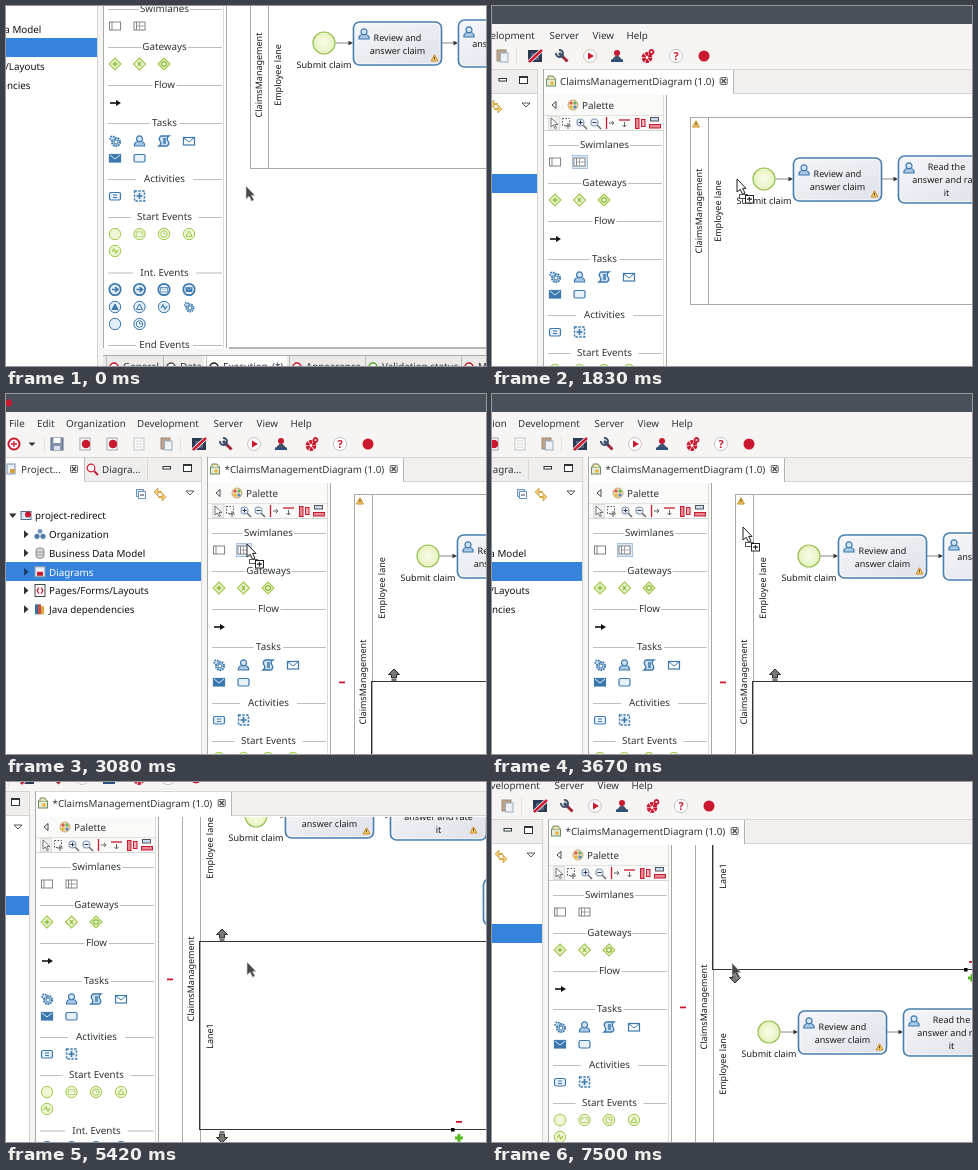
Write an HTML page that moves like this. It is 480 px wide and 360 px high and loops after 7.58 s.

```html
<!DOCTYPE html>
<html lang="en">
<head>
<meta charset="utf-8">
<title>Adding lanes to a diagram</title>
<style>
html, body { margin: 0; width: 100%; height: 100%; overflow: hidden; background: #fff; }
svg { display: block; width: 480px; height: 360px; }
text { font: 9.8px "Noto Sans", "Open Sans", sans-serif; fill: #2e3436; text-rendering: geometricPrecision; white-space: pre; }
.s { font-size: 9px; fill: #1a1a1a; }
.t { fill: #111; }
.m { text-anchor: middle; }
</style>
</head>
<body>
<svg viewBox="0 0 480 360">
  <defs>
    <linearGradient id="task" x2="1" y2="1"><stop stop-color="#f5f7fb"/><stop offset="1" stop-color="#dfe1e9"/></linearGradient>
    <radialGradient id="start"><stop stop-color="#f8fce9"/><stop offset="1" stop-color="#e4f2be"/></radialGradient>
    <clipPath id="view"><rect x="325" y="89" width="400" height="388"/></clipPath>
  </defs>
  <g id="world">
    <g id="ui"></g>
    <g id="mark"></g>
    <g id="icons"></g>
    <g id="tab"></g>
    <g id="pool" clip-path="url(#view)"></g>
    <g id="cursor"></g>
  </g>
</svg>
<script>
const $ = id => document.getElementById(id);
const BLUE = '#3b78ad', GREEN = '#a3c750', RED = '#c9182f', INK = '#2e3436', GREY = '#bdbdbb';

const rect = (x, y, w, h, fill, stroke = 'none', more = '') =>
  `<rect x="${x}" y="${y}" width="${w}" height="${h}" fill="${fill}" stroke="${stroke}" ${more}/>`;
const circ = (x, y, r, fill, stroke = 'none', w = 1) =>
  `<circle cx="${x}" cy="${y}" r="${r}" fill="${fill}" stroke="${stroke}" stroke-width="${w}"/>`;
const path = (d, stroke, w = 1, fill = 'none', more = '') =>
  `<path d="${d}" fill="${fill}" stroke="${stroke}" stroke-width="${w}" ${more}/>`;
const text = (x, y, s, cls = '', more = '') => `<text x="${x}" y="${y}" class="${cls}" ${more}>${s}</text>`;
const at = (x, y, body, k = 1) => `<g transform="translate(${x} ${y}) scale(${k})">${body}</g>`;
const hline = (x, y, w, c = GREY) => rect(x, y, w, 1, c);
const vline = (x, y, h, c = GREY) => rect(x, y, 1, h, c);
const upright = (x, y, s) => text(0, 0, s, 's m', `transform="translate(${x} ${y}) rotate(-90)"`);

// Glyphs, each centred on 0,0
const person = path('M-5 5V3Q-4 .5-1.6.5H1.6Q4 .5 5 3V5Z', BLUE, 1.2, '#a9c8e6') + circ(0, -2.2, 3, '#d3e4f5', BLUE, 1.2);
const mail = (c, fill = '#fff') => rect(-5.5, -3.5, 11, 7.5, fill, c, 'stroke-width="1.2"') +
  path('M-5-3 0 1 5-3', fill === BLUE ? '#dceafa' : c, 1);
const cog = (r, w) => `<circle r="${r}" fill="#cfe0f1" stroke="${BLUE}" stroke-width="${w}" stroke-dasharray="1.6 .9"/>`;
const gear = at(1, 1, cog(4, 2.2) + circ(0, 0, 2, '#fff', BLUE)) + at(-2.6, -2.6, cog(2.2, 1.6));
const script = path('M-3-5H5Q2-3 4 0T3 5H-5Q-2 3-4 0T-3-5ZM-1-2H2M-1 0H2M-1 2H2', BLUE, 1.3, '#cfe0f1');
const warn = path('M0-3.2 3.4 3H-3.4Z', '#c98a1c', 1, '#f8d27a', 'stroke-linejoin="round"') + rect(-.5, -1.2, 1, 2.6, '#654000');
const cross = path('M-2.2-2.2 2.2 2.2M2.2-2.2-2.2 2.2', '#444', 1.3) + rect(-3.5, -3.5, 7, 7, 'none', '#555', 'rx="1" stroke-width=".9"');
const page = rect(-5, -6, 10, 12, '#fcfcfc', '#a5a5a5') + path('M-3-3H3M-3 0H3M-3 3H3', '#ccc');
const lens = s => path('M2 2 6 6', '#666', 1.5) + circ(-.5, -.5, 3.5, '#eef4fb', '#7f97b0', 1.1) + path(s, '#335', 1);
const diamond = s => path('M0-6 6 0 0 6-6 0Z', GREEN, 1.1, '#e9f4cc') + path(s, '#8fb53a', 1.3);
const poolIcon = rect(-5.5, -4, 11, 8, '#fff', '#777', 'stroke-width=".9"') + path('M-3-4V4', '#777', .9);
const laneIcon = poolIcon + path('M-3 0H5M0-4V4', '#999', .9);
const event = (c, body, w = 1) => circ(0, 0, 5.7, c === GREEN ? '#edf7d3' : '#e3edf7', c, w) + body;
const tri = c => path('M0-3 3 2.4H-3Z', c, 1);
const wave = c => path('M-3 1-1-2 1 2 3-1', c, 1.2);
const clock = c => circ(0, 0, 3.2, '#fff', c, 1) + path('M0-2V0H2', c, 1);
const tinyMail = c => at(0, 0, mail(c), .6);
const arrowHead = (x, y) => path(`M${x} ${y}l-4.5-2.3v4.6z`, 'none', 0, '#333');
const moveUp = path('M0-6 5.5-.5H2.5V3H-2.5V-.5H-5.5Z', '#2a2a2a', 1, '#777') + path('M-2.5 5H2.5', '#2a2a2a', 1.3);

function frame() {
  const menu = { File: 3, Edit: 31, Organization: 60, Development: 131, Server: 207.5, View: 250.5, Help: 284.5 };
  const rows = ['Organization', 'Business Data Model', 'Diagrams', 'Pages/Forms/Layouts', 'Java dependencies'];
  let s = rect(0, 0, 760, 520, '#f6f5f4') + rect(0, 0, 760, 18, '#4a505a') + circ(2.5, 9, 3.5, RED);
  for (const k in menu) s += text(menu[k], 33, k);

  // Toolbar
  const marked = page + circ(1, 0, 4.2, RED);
  s += circ(8, 50, 5.5, '#fff', RED, 2) + path('M5 50H11M8 47V53', RED, 1.3) + path('M22.5 48.5H29.5L26 52Z', 'none', 0, INK) +
    vline(38, 42, 17, '#e4e3e1') + vline(174, 42, 17, '#e4e3e1') +
    at(51, 50, rect(-6, -6, 12, 12, '#8193ab', '#5a6b82') + rect(-3.5, -6, 7, 5, '#fff') + rect(-3, 2, 6, 4, '#dde3ea')) +
    at(79, 50, marked) + at(106, 50, marked) + `<g opacity=".6">${at(133, 50, page)}</g>` +
    at(160, 50, rect(-5, -6, 9, 11, '#bfa48c', '#a08a78') + rect(-1.5, -3, 7.5, 9, '#eef1f5', '#9aabbd')) +
    at(193, 50, rect(-7, -6, 14, 12, '#2b3a52') + rect(-4, -3, 8, 7, '#55637a') + path('M-6 6 7-6', '#fff', 4) + path('M-6 6 7-6', RED, 2.4)) +
    at(220, 50, path('M0 0 5.5 5.5', '#a0263a', 3) + path('M-3-3 1 1', '#41506a', 3) + path('M-6-3A3.5 3.5 0 1 0-3-6', '#41506a', 2)) +
    at(248, 50, circ(0, 0, 6.4, '#fff', '#d3bcc0') + path('M-2-3.5 4 0-2 3.5Z', 'none', 0, RED)) +
    at(275, 50, circ(0, -3, 3, RED) + path('M-4.5 4Q0-4 4.5 4Z', '#46516b', 1, '#46516b') + rect(-6, 3.5, 12, 2.5, '#2c4f7c')) +
    at(306, 50, `<circle r="3.4" cx="-1" cy="1.5" fill="none" stroke="${RED}" stroke-width="4" stroke-dasharray="2.8 .7"/>` + circ(3.5, -4, 2, 'none', RED, 1.8)) +
    at(334, 50, circ(0, 0, 6.6, '#fff', '#c4c4c4') + text(0, 4, '?', 'm', `style="fill:${RED};font-weight:700;font-size:11px"`)) +
    circ(362, 50, 5.5, RED);

  // Project view
  s += rect(0, 63, 195, 25, '#efeeec') + rect(0, 63, 78, 25, '#fff') + hline(0, 63, 195, '#d5d3d0') + vline(78, 63, 24) +
    vline(141, 66, 20, '#d9d7d4') + hline(78, 87, 117, '#d5d3d0') + rect(0, 88, 195, 420, '#fff') + vline(195, 63, 440, '#d5d3d0') +
    at(5, 75, rect(-4, -5, 8, 10, '#e7eef6', '#7b90a8') + rect(-1, 0, 5, 4, '#d8a23c')) + text(15, 79, 'Project...') + at(68, 75, cross) +
    at(86, 75, path('M2 2 6 6', RED, 2) + circ(-1, -1, 3.8, '#fff', RED, 1.2)) + text(96, 79, 'Diagra...') +
    rect(157, 72.5, 7.5, 2.5, '#fff', INK) + rect(177.5, 70.5, 8, 7, '#fff', INK) + hline(177, 71, 9, INK) +
    rect(130.5, 95.5, 7, 7, '#dbe8f7', '#6d97c2') + rect(132.5, 97.5, 7, 7, '#fff', '#6d97c2') + path('M134 101H138', '#335', 1) +
    at(154, 100, path('M-5-2H2M-2 3H5', '#dcae4a', 2.2) + path('M-2-6-6-2-2 2ZM2-1 6 3 2 7Z', '#b98a30', .6, '#f3cd72')) +
    path('M180 97H188L184 101Z', INK, .8, '#fff');
  s += path('M3 119.5H10.5L6.7 124Z', 'none', 0, INK) + at(20, 121.5, rect(-5, -4, 10, 8, '#dce7f3', '#54708e') + circ(2, -1, 3, RED)) +
    text(29, 125.2, 'project-redirect', 't') + rect(0, 168, 195, 19, '#3683dc');
  const rowIcons = [
    circ(0, -3, 2.4, '#6f93bb') + circ(-3, 2, 2.6, '#4f7caa') + circ(3, 2, 2.6, '#4f7caa'),
    rect(-4, -5, 8, 10, '#d5d8da', '#85898c', 'rx="2.5"') + path('M-4-1H4M-4 2H4', '#999'),
    rect(-5, -5, 10, 10, '#eef2f7', '#8297ad') + rect(-3, 0, 6, 4, RED),
    rect(-5, -6, 10, 12, '#fff', '#444') + path('M-1-3-3 0-1 3M1-3 3 0 1 3', RED, 1.2),
    rect(-5, -5, 3, 10, '#3c6c9c') + rect(-2, -5, 3, 10, '#cc4c42') + rect(1, -3, 3, 8, '#d9a63c')
  ];
  rows.forEach((r, i) => {
    const y = 140.3 + i * 18.75, on = i === 2;
    s += path(`M18 ${y - 4}V${y + 4}L22.5 ${y}Z`, 'none', 0, on ? '#1d3d66' : INK) + at(34, y, rowIcons[i]) +
      text(43, y + 3.7, r, 't', on ? 'style="fill:#fff"' : '');
  });

  // Editor shell and palette
  s += rect(201, 63, 560, 25, '#f1f0ee') + hline(201, 63, 560, '#d9d7d4') + rect(201, 88, 560, 391, '#fff') + vline(201, 63, 415, '#aaa') +
    rect(202, 88, 122, 37, '#fafaf9') + hline(202, 109, 119, '#e2e2e0') + hline(202, 124, 119, '#d4d4d2') +
    vline(321, 88, 390, '#dcdcda') + vline(324, 88, 390, '#a5a5a3') +
    path('M214 95.5V102.5L210 99Z', INK, .9, '#fff') +
    at(231, 99, circ(0, 0, 5, '#ecd9b2', '#c09a5c', .8) + circ(-2, -2, 1.6, '#d9534f') + circ(2, -2, 1.6, '#5fb063') + circ(2, 2, 1.6, '#4f86c6') + circ(-2, 2, 1.5, '#e9b52b')) +
    text(240, 102.6, 'Palette') + rect(206.5, 110.5, 11, 13, '#f0f0ee', '#dcdcda') +
    path('M209 112V121L211.3 119 213 122.5 214.4 121.8 212.8 118.5H216Z', '#555', .8, '#fff') +
    rect(220.5, 112.5, 7, 7, 'none', '#555', 'stroke-dasharray="1.5 1.5"') + path('M226 117V123M223 120H229', '#666', 1) +
    at(239, 117, lens('M-2.5-.5H1.5M-.5-2.5V1.5')) + at(253, 117, lens('M-2.5-.5H1.5')) +
    path('M264.5 111V123', RED, 1.3) + path('M267 117H272M270 115 272 117 270 119', '#666', 1) +
    path('M277 114H288', RED, 1.3) + path('M282.5 116V121M280.5 119 282.5 121 284.5 119', '#666', 1) +
    rect(293.5, 112.5, 3.5, 10, '#e48a92', RED) + rect(299.5, 113.5, 3.5, 7, '#e9b3b8', RED) +
    rect(308.5, 111.5, 8, 3.5, '#c9dcf0', '#555') + rect(307.5, 118.5, 11, 3.5, '#e48a92', RED);
  const heads = { Swimlanes: 139, Gateways: 177, Flow: 215, Tasks: 253, Activities: 309, 'Start Events': 347, 'Int. Events': 402.5, 'End Events': 475 };
  for (const k in heads) {
    const y = heads[k], half = k.length * 2.75 + 1;
    s += hline(206, y, 56.5 - half) + hline(262.5 + half, y, 57.5 - half) + text(262.5, y + 3.4, k, 'm');
  }

  // Lower panel
  s += rect(201, 479, 560, 40, '#f6f5f4') + rect(327, 477, 430, 2, '#b5b5b3') + rect(201, 485, 560, 30, '#ebeae8') + hline(201, 485, 560, '#aaa') +
    rect(302, 486, 83, 28, '#fff');
  const tabs = { General: 221, Data: 278, Execution: 321, Appearance: 404, 'Validation status': 480, Monitoring: 576 };
  const tint = [RED, '#555', '#222', RED, '#58a52c', RED];
  Object.keys(tabs).forEach((k, i) => {
    s += text(tabs[k], 500, k) + vline(tabs[k] - 17, 486, 30, '#bbb') + circ(tabs[k] - 9, 497, 4, '#fff', tint[i], 1.5);
  });
  return s + text(370, 500, '(*)');
}

function paletteIcons() {
  const col = [213, 237.5, 262, 287], B = (g, w) => event(BLUE, g, w);
  const arrowIn = path('M-3 0H2M0-2.3 3 0 0 2.3', BLUE, 1.5);
  const box = rect(-5.5, -3.5, 11, 7.5, '#e8f0f9', BLUE, 'rx="1.5" stroke-width="1.2"');
  const grid = [
    [156, poolIcon, laneIcon],
    [194, diamond('M-2.5 0H2.5M0-2.5V2.5'), diamond('M-1.4-2 1.4 2M1.4-2-1.4 2'), diamond('M-2.5-1 0-2.5 2.5-1V1L0 2.5-2.5 1Z')],
    [233, path('M-5 0H3', '#111', 1.6) + path('M1-3 6 0 1 3Z', 'none', 0, '#111')],
    [271, gear, person, script, mail(BLUE)],
    [288, mail(BLUE, BLUE), box],
    [326, box + path('M-2-1H2M-2 1.5H2', BLUE, 1),
      rect(-5, -5, 10, 10, '#e8f0f9', BLUE, 'stroke-width="1.4" stroke-dasharray="2.4 1.4"') + path('M-3 0H3M0-3V3', BLUE, 1.6)],
    [364, event(GREEN, ''), event(GREEN, tinyMail(GREEN)), event(GREEN, clock(GREEN)), event(GREEN, tri(GREEN))],
    [381, event(GREEN, wave(GREEN))],
    [419.5, B(arrowIn, 1.7), B(arrowIn, 1.7), B(tinyMail(BLUE), 1.7), B(at(0, 0, mail(BLUE, BLUE), .55), 1.7)],
    [437, B(path('M0-3 3 2.4H-3Z', BLUE, 1, BLUE)), B(tri(BLUE)), B(wave(BLUE)), at(0, 0, gear, .9)],
    [454, B(''), B(clock(BLUE))]
  ];
  return grid.map(([y, ...g]) => g.map((b, i) => at(col[i], y, b)).join('')).join('');
}

function editorTab(dirty) {
  const end = dirty ? 397 : 391;
  return rect(202, 64, end - 202, 25, '#fff') + hline(end, 87, 360, '#d5d3d0') + vline(end, 64, 24, '#b5b5b3') +
    at(209, 75, rect(-4.5, -2, 9, 7, '#e3ecd9', '#6d8a61') + path('M-3-2V-5H2L4-2', '#6d8a61', 1, '#f3e6b5') + circ(1, 2, 1.8, '#f0b030')) +
    text(dirty ? 218.5 : 218, 79, (dirty ? '*' : '') + 'ClaimsManagementDiagram (1.0)') + at(end - 9.3, 75, cross);
}

function taskBox(x, y, w, h) {
  return rect(x, y, w, h, 'url(#task)', '#4a80b0', 'rx="6" stroke-width="1.7"') +
    rect(x + 1.6, y + 1.6, w - 3.2, h - 3.2, 'none', '#fff', 'rx="5" stroke-opacity=".5"');
}

function employeeFlow(top) {
  const y = top + 62, flow = (a, b) => path(`M${a} ${y}H${b - 4}`, '#888', 1) + arrowHead(b, y);
  const lines = (x, list, base) => list.map((s, i) => text(x, y + base + i * 13, s, 's m')).join('');
  return circ(422, y, 11, 'url(#start)', '#9bbf55', 1.2) + text(422, y + 24.6, 'Submit claim', 's m') +
    flow(433.5, 451) + flow(540, 556) +
    taskBox(451.5, y - 21, 88, 43) + at(462, y - 9, person) + lines(495.5, ['Review and', 'answer claim'], -2.4) + at(532.5, y + 15, warn) +
    taskBox(556.5, y - 23, 96, 47) + at(567, y - 11, person) + lines(604.5, ['Read the', 'answer and rate', 'it'], -9.4) + at(639.5, y + 14, warn) +
    taskBox(649.5, y + 63, 96, 46);
}

function pool({ top, lanes, pick }) {
  const sizes = [188, 188, 74];
  const height = lanes.reduce((h, _, i) => h + sizes[i], 0), mid = top + height / 2;
  let s = rect(348.5, top + .5, 523, height - 1, '#fff', '#aaa') + vline(366, top, height, '#aaa') +
    upright(360, mid, 'ClaimsManagement') + at(354, top + 7, warn);
  let y = top, over = '';
  lanes.forEach((name, i) => {
    const h = sizes[i], end = y + h;
    if (i) s += hline(366, y - 1, 506, '#8f8f8f');
    s += upright(378.5, y + h / 2, name);
    if (name === EMP) s += employeeFlow(y);
    if (name === pick) {
      over = rect(365.5, y - .5, 506, h, 'none', '#333') +
        rect(617, end - 2, 3.5, 3.5, '#000') + rect(622, end - 9, 6, 1.8, RED) + path(`M625 ${end + 4}v8M621 ${end + 8}h8`, '#56bb22', 2.8);
      if (i) over += at(388, y - 7, moveUp);
      if (i < lanes.length - 1) over += at(388, end + 7, `<g transform="scale(1 -1)">${moveUp}</g>`);
    }
    y = end;
  });
  if (lanes.length > 1) over += rect(333, mid - .5, 6, 1.8, RED);
  return s + over;
}

const EMP = 'Employee lane';
const scenes = [
  { from: 0, top: 111, lanes: [EMP] },
  { from: 1900, top: 100, lanes: [EMP, 'Lane1'], pick: 'Lane1' },
  { from: 4150, top: 26, lanes: [EMP, 'Lane1', 'Lane2'], pick: 'Lane2' },
  { from: 5200, top: 26, lanes: [EMP, 'Lane1', 'Lane2'], pick: 'Lane1' },
  { from: 6500, top: 26, lanes: ['Lane1', EMP, 'Lane2'], pick: 'Lane1' }
];

// Keys: time, x, y
const camera = [[0, 104, 136], [80, 104, 136], [920, 0, 0], [1080, 0, 0], [1850, 150, 0], [2150, 150, 0], [2583, 57, 0], [2850, 0, 0],
  [3100, 0, 0], [3667, 105, 0], [4150, 165, 14], [4583, 165, 14], [5000, 172, 54], [5750, 172, 54], [6420, 145, 26]];
const pointer = [[0, 344, 316], [60, 344, 316], [850, 240, 150], [1060, 240, 150], [1800, 395, 172], [2100, 395, 176], [2583, 288, 174], [2800, 240, 150],
  [3050, 240, 150], [3667, 356, 133], [4080, 413, 200], [4583, 413, 209], [4900, 413, 234], [5600, 413, 234], [6300, 385, 207]];

// Monotone cubic through the keys
function track(keys, t, c) {
  const n = keys.length - 1;
  if (t >= keys[n][0]) return keys[n][c];
  const i = keys.findIndex(k => k[0] > t) - 1;
  const slope = j => j < 0 || j >= n ? 0 : (keys[j + 1][c] - keys[j][c]) / (keys[j + 1][0] - keys[j][0]);
  const tangent = j => { const a = slope(j - 1), b = slope(j); return a * b > 0 ? 2 * a * b / (a + b) : 0; };
  const span = keys[i + 1][0] - keys[i][0], u = (t - keys[i][0]) / span, v = 1 - u;
  return keys[i][c] * v * v * (1 + 2 * u) + keys[i + 1][c] * u * u * (3 - 2 * u) +
    span * u * v * (v * tangent(i) - u * tangent(i + 1));
}

const arrow = 'M0 0V13L3.2 10.3 5.6 15.3 8 14.1 5.6 9.4H9Z';
const cursors = {
  plain: path(arrow, '#d8d8d8', .6, '#484848'),
  drag: path(arrow, '#222', 1, '#fff') + rect(2.5, 15.5, 8, 4, '#fff', '#555') + rect(8.5, 16.5, 8, 7.5, '#fff', '#222') + path('M10 20.2H15M12.5 18V22.5', '#222', 1.2)
};
const shown = {};
function put(id, key, make) {
  if (shown[id] === key) return;
  shown[id] = key;
  $(id).innerHTML = make();
}

$('ui').innerHTML = frame();
$('icons').innerHTML = paletteIcons();

const LOOP = 7580, begin = performance.now();
function draw(now) {
  const t = Math.floor((Math.max(0, now - begin) % LOOP + 4) * .012) / .012;
  const scene = scenes.filter(s => s.from <= t).pop(), dirty = scene !== scenes[0];
  const drag = t > 1120 && t < 1900 || t > 3020 && t < 4150;
  const hover = !drag && (t > 800 && t < 1900 || t > 2740 && t < 3030);
  put('pool', scene.from, () => pool(scene));
  put('tab', dirty, () => editorTab(dirty));
  put('mark', drag ? 'on' : hover ? 'over' : '', () =>
    drag ? rect(230.5, 149.5, 15, 13, '#dbe8f5', '#a9c3de') : hover ? rect(230.5, 149.5, 15, 13, '#fbe6cc', '#efc894') : '');
  put('cursor', drag, () => cursors[drag ? 'drag' : 'plain']);
  const place = (id, keys, sign) => $(id).setAttribute('transform',
    `translate(${sign * Math.round(track(keys, t, 1))} ${sign * Math.round(track(keys, t, 2))})`);
  place('world', camera, -1);
  place('cursor', pointer, 1);
  requestAnimationFrame(draw);
}
draw(begin);
</script>
</body>
</html>
```
